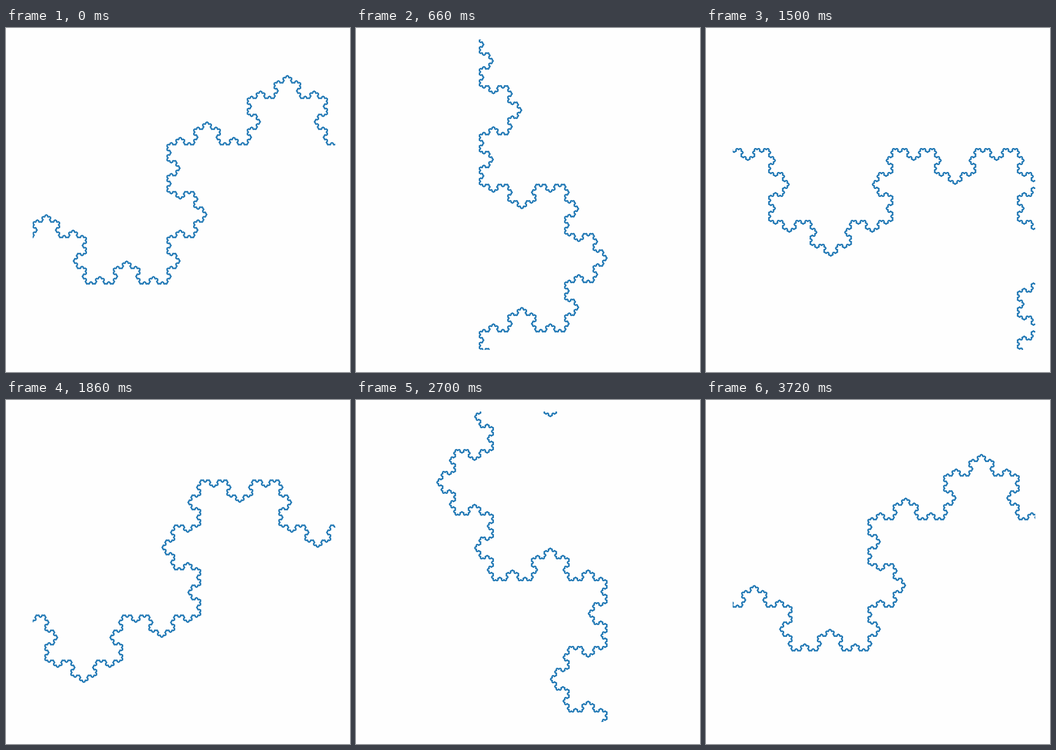
Write an HTML page with a canvas that moves like this. It is 748 px wide and 748 px high and loops after 3.78 s.

```html
<!DOCTYPE html>
<html lang="en">
<head>
<meta charset="utf-8">
<title>Koch curve zoom</title>
<style>
  html, body { margin: 0; width: 100%; height: 100%; overflow: hidden; background: #fefefe; }
  canvas { display: block; }
</style>
</head>
<body>
<canvas width="748" height="748"></canvas>
<script>
const ctx = document.querySelector('canvas').getContext('2d');
const STEP = 60, STEPS = 63, ZOOM = 10 / 9;
const BOX = { x: 58, y: 25, w: 658, h: 675 };
const CENTER = { x: 387.2, y: 362.5 };
const BASE = 302.6 * 3 ** 6;
const TURN = Math.PI / 3;
// Point of the unit curve that lies in the second quarter at every level
const FOCUS = { along: 5 / 14, side: Math.sqrt(3) / 14 };

function koch(x, y, len, angle) {
  const dx = len * Math.cos(angle), dy = len * Math.sin(angle);
  const reach = len / 2 + 4;
  const outside =
    Math.abs(x + dx / 2 - BOX.x - BOX.w / 2) > BOX.w / 2 + reach ||
    Math.abs(y + dy / 2 - BOX.y - BOX.h / 2) > BOX.h / 2 + reach;
  if (outside) {
    ctx.moveTo(x + dx, y + dy);
  } else if (len < 1.3) {
    ctx.lineTo(x + dx, y + dy);
  } else {
    const part = len / 3;
    for (const turn of [0, -TURN, TURN, 0]) {
      koch(x, y, part, angle + turn);
      x += part * Math.cos(angle + turn);
      y += part * Math.sin(angle + turn);
    }
  }
}

function draw(step) {
  const len = BASE * ZOOM ** step;
  ctx.fillStyle = '#fefefe';
  ctx.fillRect(0, 0, 748, 748);
  ctx.save();
  ctx.beginPath();
  ctx.rect(BOX.x, BOX.y, BOX.w, BOX.h);
  ctx.clip();
  ctx.strokeStyle = '#1f77b4';
  ctx.lineWidth = 2.1;
  ctx.lineJoin = 'round';
  ctx.beginPath();
  const x = CENTER.x - len * FOCUS.side, y = CENTER.y - len * FOCUS.along;
  ctx.moveTo(x, y);
  koch(x, y, len, Math.PI / 2);
  ctx.stroke();
  ctx.restore();
}

const start = performance.now();
let shown = -1;
function tick() {
  const step = Math.floor(Math.max(0, performance.now() - start) / STEP) % STEPS;
  if (step !== shown) draw(shown = step);
  requestAnimationFrame(tick);
}
tick();
</script>
</body>
</html>
```
